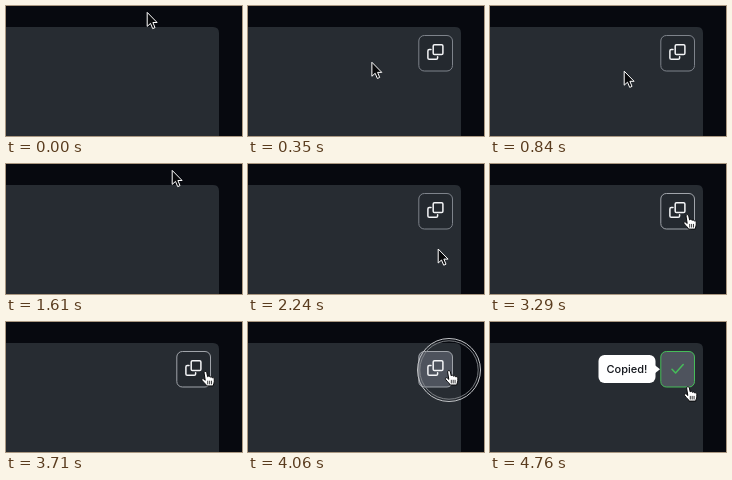
Animation, 236 px wide and 130 px high, one loop 4830 ms. Source, as an HTML page:

```html
<!DOCTYPE html>
<html lang="en">
<head>
<meta charset="utf-8">
<title>Copy button</title>
<style>
  html, body { margin: 0; width: 100%; height: 100%; overflow: hidden; background: #07090f; }
  svg { display: block; width: 100%; height: 100%; }
  text { font: 500 11px Inter, sans-serif; fill: #12151b; }
  .line { fill: none; stroke-linecap: round; stroke-linejoin: round; }
</style>
</head>
<body>
<svg viewBox="0 0 236 130">
  <rect width="236" height="130" fill="#07090f"/>
  <path d="M0 21H207q6 0 6 6V130H0Z" fill="#272c32"/>

  <g id="button">
    <rect id="face" x="170.8" y="29.5" width="33.7" height="35.5" rx="5.5"/>
    <g id="copy" class="line" stroke="#f4f5f7" stroke-width="1.5">
      <rect x="185.2" y="38.8" width="9.7" height="9.7" rx="1.3"/>
      <path d="M183 43.6h-1.7q-1.4 0-1.4 1.4v6.9q0 1.4 1.4 1.4h6.9q1.4 0 1.4-1.4v-1.2"/>
    </g>
    <path id="check" class="line" d="M182 47.2l3.6 3.7 7.6-8.3" stroke="#46bd59" stroke-width="1.5"/>
  </g>

  <g id="tip">
    <path d="M164 42.5l6 4.7-6 4.7Z" fill="#fff"/>
    <rect x="108.5" y="33" width="57" height="28" rx="6" fill="#fff"/>
    <text x="137" y="51" text-anchor="middle">Copied!</text>
  </g>

  <g id="ring" fill="none">
    <circle id="outer" cx="201" cy="48" stroke="#c3c5c8"/>
    <circle id="inner" cx="201" cy="48" stroke="#85888d" stroke-width=".9"/>
  </g>

  <path id="arrow" d="M0 0V14L3.3 11 5.5 16.2 7.8 15.2 5.7 10.1H9.9Z"
        fill="#08090b" stroke="#fff" stroke-linejoin="round"/>
  <g id="hand" stroke="#08090b" stroke-linejoin="round">
    <path fill="#fff" d="M-1.4 1.4C-1.4-.2 .9-.4 1.3 1.3L2.2 5.4C2.8 4.4 4.4 4.6 4.6 5.9
      C5.4 5 6.7 5.5 6.8 6.6C7.6 5.9 8.8 6.4 8.8 7.8V10.4C8.8 12.3 7.8 12.8 7.7 14.6H1
      C.8 13-1.4 11.6-3.3 9.2C-4.3 7.6-2.7 6.7-1.5 7.8L-.2 9Z"/>
    <path class="line" stroke-width=".8" d="M2.3 9.8v2.8M4.2 9.8v2.8M6.1 9.8v2.8"/>
  </g>
</svg>
<script>
const LOOP = 4830, STEP = 70, PRESS = 3780, COPIED = 4130;
const el = id => document.getElementById(id);

// Turning points of the cursor: time, x, y.
const stops = [
  [0, 141.2, 6.4], [490, 119.6, 68.6], [630, 119.6, 68.6], [840, 134.2, 65.2],
  [1190, 142, 9], [1610, 166.2, 6.4], [1820, 212, 17], [1960, 225, 44], [2240, 190.2, 85],
  [2590, 186, 52], [2940, 209.4, 46], [3290, 197.4, 50.5], [4060, 201, 48.4],
  [4480, 201, 48.4], [4760, 198, 64.5]
];

const ramp = (t, from, length = 140) => Math.min(1, Math.max(0, (t - from) / length));
const mix = (a, b, k) => a.map((v, i) => v + (b[i] - v) * k);
const rgb = c => `rgb(${c.map(Math.round)})`;
const set = (id, name, value) => el(id).setAttribute(name, value);
const fade = (id, value) => set(id, 'opacity', value);

// Slope at a stop; zero where the motion along that axis turns round or rests.
function slope(i, axis) {
  const rate = j => stops[j] && stops[j - 1]
    ? (stops[j][axis] - stops[j - 1][axis]) / (stops[j][0] - stops[j - 1][0]) : 0;
  const before = rate(i), after = rate(i + 1);
  return before * after > 0 ? 2 * before * after / (before + after) : 0;
}

// Smooth curve through the stops (cubic Hermite).
function cursor(t) {
  const i = Math.min(stops.filter(s => s[0] <= t).length, stops.length - 1);
  const a = stops[i - 1], b = stops[i], span = b[0] - a[0], k = ramp(t, a[0], span);
  return [1, 2].map(axis =>
    a[axis] + (b[axis] - a[axis]) * k * k * (3 - 2 * k)
    + span * k * (1 - k) * ((1 - k) * slope(i - 1, axis) - k * slope(i, axis)));
}

function draw(t) {
  const [x, y] = cursor(t);
  const over = x > 171 && x < 204.5 && y > 29 && y < 65;
  const pressed = ramp(t, PRESS), done = ramp(t, COPIED);
  const radius = 8 + 23.5 * ramp(t, PRESS, 280);

  for (const id of ['arrow', 'hand']) set(id, 'transform', `translate(${x} ${y})`);
  fade('arrow', over ? 0 : 1);
  fade('hand', over ? 1 : 0);

  fade('button', ramp(t, 140) - ramp(t, 1050) + ramp(t, 2100));
  set('face', 'fill', rgb(mix([36, 41, 47], [78, 83, 93], pressed)));
  set('face', 'stroke', rgb(mix(over ? [160, 164, 170] : [126, 131, 139], [70, 189, 89], done)));
  fade('copy', 1 - done);
  fade('check', done);
  fade('tip', ramp(t, COPIED + STEP, 210));

  fade('ring', ramp(t, PRESS - STEP, STEP) - ramp(t, COPIED, 210));
  set('outer', 'r', radius);
  set('inner', 'r', radius - 2.3);
}

const start = performance.now();
function tick() {
  const t = (performance.now() - start) % LOOP;
  draw(Math.floor(t / STEP) * STEP);
  requestAnimationFrame(tick);
}
tick();
</script>
</body>
</html>
```
